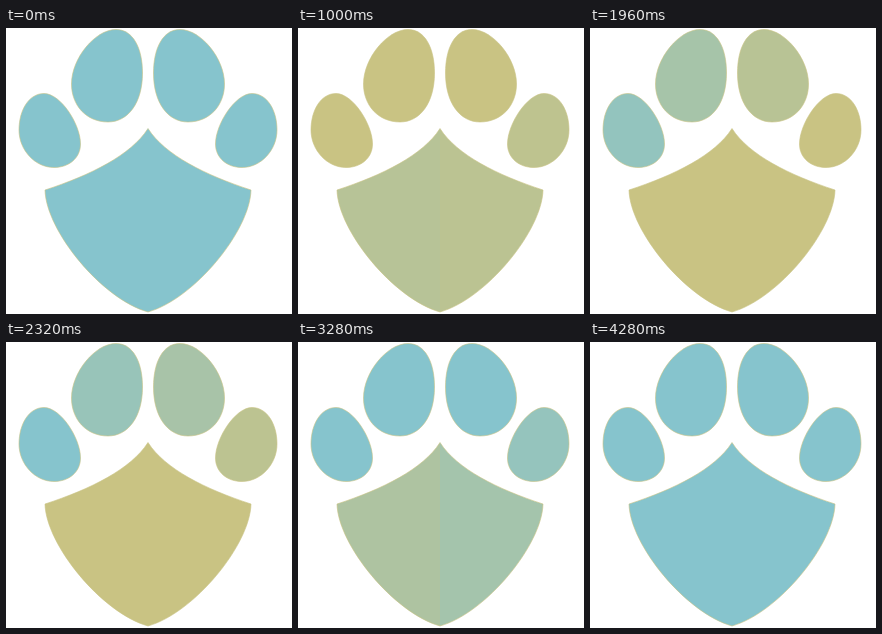
Animation, 286 px wide and 286 px high, one loop 4320 ms. Source, as an HTML page with a canvas:

```html
<!DOCTYPE html>
<html lang="en">
<head>
<meta charset="utf-8">
<title>Paw</title>
<style>
  html, body { margin: 0; width: 100%; height: 100%; overflow: hidden; background: #fff; }
  canvas { display: block; width: 286px; height: 286px; }
</style>
</head>
<body>
<canvas id="stage" width="286" height="286"></canvas>
<script>
const ctx = document.getElementById('stage').getContext('2d');
const LOOP = 4320, STEP = 40, AXIS = 142;
const TEAL = [134, 196, 205], SAND = [201, 195, 131];

const outer = new Path2D('M38 65.5C54.5 65.5 74.5 96 74.5 116C74.5 130 63 139.5 48 139.5C29 139.5 13 122 13 102C13 82 23 65.5 38 65.5');
const inner = new Path2D('M110 1.5C127 1.5 136.5 20 136.5 45C136.5 75 122 94 102 94C80 94 65.5 77 65.5 56C65.5 30 89.5 1.5 110 1.5');
const pad = new Path2D('M142 100.5C125 127 85 147 39 162C40 203 96 271 142 284');

// Each part warms up from 0 to `warm`, then cools between `from` and `to`.
const parts = [
  { path: outer, flip: false, warm: 550, from: 1000, to: 2200 },
  { path: inner, flip: false, warm: 590, from: 1120, to: 2750 },
  { path: inner, flip: true, warm: 780, from: 1600, to: 3050 },
  { path: outer, flip: true, warm: 1200, from: 2000, to: 3640 },
  { path: pad, flip: true, warm: 1260, from: 2340, to: 4040 },
  { path: pad, flip: false, warm: 1360, from: 2620, to: 4240 }
];

const ramp = (t, a, b) => Math.min(1, Math.max(0, (t - a) / (b - a)));
const mix = k => `rgb(${TEAL.map((c, i) => Math.round(c + (SAND[i] - c) * k))})`;

function drawPart(p, t) {
  const warmth = Math.min(ramp(t, 0, p.warm), 1 - ramp(t, p.from, p.to));
  ctx.save();
  if (p.flip) {
    ctx.translate(2 * AXIS, 0);
    ctx.scale(-1, 1);
  }
  ctx.fillStyle = mix(warmth);
  ctx.fill(p.path);
  ctx.strokeStyle = mix(1);
  ctx.lineWidth = 0.6;
  ctx.stroke(p.path);
  ctx.restore();
}

function render(t) {
  ctx.fillStyle = '#fff';
  ctx.fillRect(0, 0, 286, 286);
  for (const p of parts) drawPart(p, t);
}

const start = performance.now();
function tick() {
  const t = (performance.now() - start) % LOOP;
  render(Math.floor(t / STEP) * STEP);
  requestAnimationFrame(tick);
}
tick();
</script>
</body>
</html>
```
